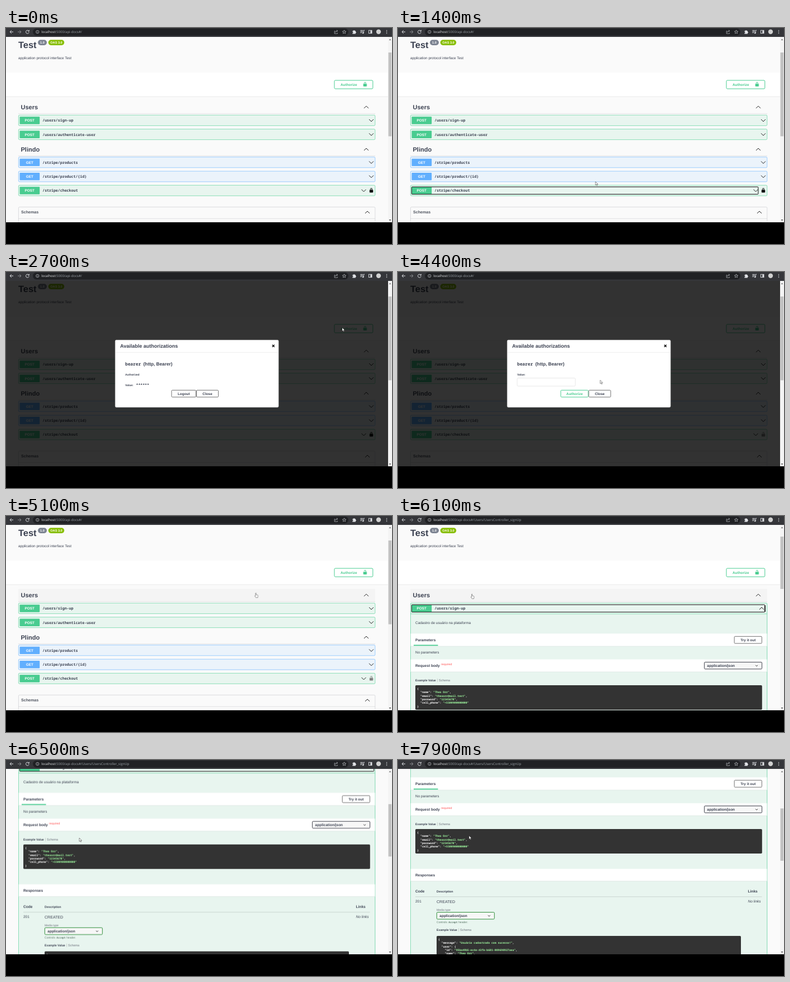
Animation, 690 px wide and 388 px high, one loop 8000 ms. Source, as an HTML page:

```html
<!DOCTYPE html>
<html lang="en">
<head>
<meta charset="utf-8">
<title>API docs</title>
<style>
html, body { margin: 0; width: 100%; height: 100%; overflow: hidden; background: #000; }
svg { display: block; width: 690px; height: 388px; }
text { font-family: "Liberation Sans", Arial, sans-serif; fill: #3b4151; white-space: pre; text-rendering: geometricPrecision; }
.b { font-weight: 700; }
.i { font-style: italic; }
.m { font-family: "Noto Sans Mono", "DejaVu Sans Mono", monospace; font-weight: 700; }
.url { font-family: "Open Sans", "Noto Sans", sans-serif; }
.mid { text-anchor: middle; }

/* timed states: 1% is 80 ms */
.focus, .modal, .signed, .unsigned, .list, .open, .fresh, .settled, .hover, .arrow, .hand, .pointer { animation: 8s step-end infinite; }
.focus { animation-name: focus; }
.modal { animation-name: modal; }
.signed { animation-name: signed; }
.unsigned { animation-name: unsigned; }
.list { animation-name: list; }
.open { animation-name: open; }
.fresh { animation-name: fresh; }
.settled { animation-name: settled; }
.hover { animation-name: hover; }
.arrow { animation-name: arrow; }
.hand { animation-name: hand; }
.pointer { animation-name: pointer; }
@keyframes focus { 0%, 100% { opacity: 0 } 17.3% { opacity: 1 } 31.8% { opacity: 0 } }
@keyframes modal { 0%, 100% { opacity: 0 } 32.3% { opacity: 1 } 62.3% { opacity: 0 } }
@keyframes signed { 0% { opacity: 1 } 51.1%, 100% { opacity: 0 } }
@keyframes unsigned { 0% { opacity: 0 } 51.1%, 100% { opacity: 1 } }
@keyframes list { 0% { opacity: 1 } 72.3%, 100% { opacity: 0 } }
@keyframes open { 0% { opacity: 0 } 72.3%, 100% { opacity: 1 } }
@keyframes fresh { 0% { opacity: 1 } 77.2%, 100% { opacity: 0 } }
@keyframes settled { 0% { opacity: 0 } 77.2%, 100% { opacity: 1 } }
@keyframes hover { 0%, 100% { opacity: 0 } 62.3% { opacity: 1 } 69% { opacity: 0 } 75% { opacity: 1 } 77.2% { opacity: 0 } }
@keyframes pointer { 0% { opacity: 0 } 17.3%, 100% { opacity: 1 } }
@keyframes hand { 0%, 100% { opacity: 0 } 30.6% { opacity: 1 } 32.3% { opacity: 0 } 48% { opacity: 1 } 54% { opacity: 0 } 60% { opacity: 1 } 77.2% { opacity: 0 } }
@keyframes arrow { 0%, 100% { opacity: 1 } 30.6% { opacity: 0 } 32.3% { opacity: 1 } 48% { opacity: 0 } 54% { opacity: 1 } 60% { opacity: 0 } 77.2% { opacity: 1 } }

/* motion */
.scroll { animation: scroll 8s linear infinite; }
.thumb { animation: thumb 8s linear infinite; }
.path { animation: path 8s linear infinite; }
@keyframes scroll {
  0%, 76.6% { transform: translateY(0) } 78.6%, 79.6% { transform: translateY(-90px) }
  82%, 100% { transform: translateY(-180px) }
}
@keyframes thumb {
  0%, 76.6% { transform: translateY(0) } 78.6%, 79.6% { transform: translateY(25px) }
  82%, 100% { transform: translateY(50px) }
}
@keyframes path {
  0%, 17.6% { transform: translate(353px, 276px) }
  27.5% { transform: translate(562px, 127px) }
  31%, 34.5% { transform: translate(601px, 100px) }
  38.75% { transform: translate(462px, 130px) }
  48.75%, 53% { transform: translate(319px, 217px) }
  60.5%, 62.3% { transform: translate(477px, 132px) }
  63.75% { transform: translate(446px, 138px) }
  70.5%, 73% { transform: translate(132px, 163px) }
  75.5%, 90% { transform: translate(131px, 140px) }
  93.75%, 95% { transform: translate(45px, 148px) }
  96.25% { transform: translate(40px, 130px) }
  98.6%, 100% { transform: translate(127px, 136px) }
}
</style>
</head>
<body>
<svg id="stage" viewBox="0 0 690 388"></svg>
<script>
const GREEN = '#49cc90', BLUE = '#61affe', INK = '#3b4151';

const text = (x, y, size, str, cls = '', fill = INK) =>
  `<text x="${x}" y="${y}" class="${cls}" style="font-size:${size}px;fill:${fill}">${str}</text>`;
const box = (x, y, w, h, fill = 'none', stroke = 'none', sw = 1, r = 0) =>
  `<rect x="${x}" y="${y}" width="${w}" height="${h}" rx="${r}" fill="${fill}" stroke="${stroke}" stroke-width="${sw}"/>`;
const line = (d, stroke = '#000', w = 1) =>
  `<path d="${d}" fill="none" stroke="${stroke}" stroke-width="${w}"/>`;
const rule = (y, x1 = 22, x2 = 660, c = '#c4c6cb') => line(`M${x1} ${y}H${x2}`, c, 0.5);
const group = (cls, ...parts) => `<g class="${cls}">${parts.join('')}</g>`;
const chevron = (x, y, up, r = 4, w = 1) =>
  line(`M${x - r} ${y + (up ? r : -r) / 2}l${r} ${up ? -r : r}l${r} ${up ? r : -r}`, '#222', w);

function lock(x, y, fill, open) {
  const gap = open ? 'V6h2v-.8C8 3.75 8.8 3 10 3s2 .75 2 2.2V8H4' : 'V8H4';
  const hole = open ? '' : 'M12 8H8V5.2C8 3.75 8.8 3 10 3s2 .75 2 2.2z';
  return `<path transform="translate(${x - 4.5} ${y - 4.5}) scale(.45)" fill="${fill}" fill-rule="evenodd"
    d="M15.8 8H14V5.6C14 2.7 12.7 1 10 1S6 2.7 6 5.6${gap}c-.55 0-1 .65-1 1.2V17c0 .55.43 1.14.95 1.3l1.2.4c.52.16 1.4.3 1.95.3h5.8c.55 0 1.43-.14 1.95-.3l1.2-.4c.52-.16.95-.75.95-1.3V9.2c0-.55-.65-1.2-1.2-1.2z${hole}"/>`;
}
const locks = (x, y, shut, free) =>
  group('signed', lock(x, y, shut)) + group('unsigned', lock(x, y, free, true));

function summary(y, verb, path) {
  const c = verb === 'GET' ? BLUE : GREEN;
  return box(24.5, y - 6.7, 35.7, 13.4, c, 'none', 0, 1) +
    text(42.3, y + 2.3, 6.4, verb, 'b mid', '#fff') + text(65.2, y + 2.3, 6.58, path, 'm');
}
function row(y, verb, path, arrowX = 653) {
  const get = verb === 'GET';
  return box(22.4, y - 9.6, 637.4, 19, get ? '#ebf3fb' : '#e8f5ef', get ? BLUE : GREEN, 0.6, 1.8) +
    summary(y, verb, path) + chevron(arrowX, y);
}
const tag = (y, name) => text(26.5, y, 11, name, 'b') + chevron(644, y - 4, true) + rule(y + 7.8);
const band = (y, h) => box(22.7, y, 636.8, h, '#fff', 'none', 0) + rule(y + h, 22.7, 659.5, '#cfd8d4');
const button = (x, y, w, h, label, c = '#707070', ink = INK) =>
  box(x, y, w, h, '#fff', c, 1, 1.5) + text(x + w / 2, y + h / 2 + 2.2, 6.4, label, 'b mid', ink);
const select = (x, y, c) => box(x, y, 103, 12.4, '#f7f7f7', c, 1, 1.6) +
  text(x + 5, y + 8.4, 6.5, 'application/json', 'b') + chevron(x + 93.5, y + 6.4, false, 2, 0.9);
const tabs = (x, y) => text(x, y, 5.25, 'Example Value', 'b') + line(`M${x + 39.5} ${y - 5}v6`, '#aaa', 0.5) +
  text(x + 42, y, 5.5, 'Schema', '', '#6b6f7a');
const code = (x, y, lines) => lines.map((s, i) => text(x, y + i * 6.4, 4.8,
  s.replace(/: (".*")/, ': <tspan fill="#a2fca2">$1</tspan>'), 'm', '#fff')).join('');

const user = ['"name": "Theo Orr",', '"email": "theoorr@mail.test",', '"password": "12345678",', '"cell_phone": "+5500900000000"'];

const intro =
  box(0, 16, 683, 1000, '#fafafa') +
  text(22, 36, 16.4, 'Test', 'b') +
  box(57, 21.3, 16, 9.6, '#7d8492', 'none', 0, 4.8) + text(65, 28, 5.6, '1.0', 'b mid', '#fff') +
  box(75.6, 21.3, 28.6, 9.6, '#89bf04', 'none', 0, 4.8) + text(90, 28, 5.6, 'OAS 3.0', 'b mid', '#fff') +
  text(22, 56, 6.42, 'application protocol interface Test') +
  box(0, 80, 683, 43, '#fff') + rule(123.3, 0, 683, '#d8d8d8') +
  box(587, 94, 68.8, 15.2, '#fff', GREEN, 1, 1.8) + text(598, 103.6, 6.4, 'Authorize', 'b', GREEN) +
  locks(641.8, 101, GREEN, GREEN) +
  group('hover', box(22, 131, 638, 22.5, 'rgba(0,0,0,.022)')) +
  tag(146.2, 'Users');

const collapsed = group('list',
  row(166, 'POST', '/users/sign-up'),
  row(191.2, 'POST', '/users/authenticate-user'),
  tag(222, 'Plindo'),
  row(241.4, 'GET', '/stripe/products'),
  row(266.8, 'GET', '/stripe/product/{id}'),
  row(292, 'POST', '/stripe/checkout', 639.5),
  locks(653, 291.6, '#000', '#808080'),
  group('focus', box(24.3, 285.4, 619.6, 13.2, 'none', '#111', 1, 1)),
  box(22.4, 321.6, 637.4, 100, '#fafafa', '#c4c6cb', 0.6, 1.8),
  text(27, 333, 7.1, 'Schemas', 'b', '#505560'), chevron(646, 331, true), rule(342.3),
  box(31.5, 348, 619, 20, '#ececec'));

const expanded = group('open',
  box(22.4, 156.4, 637.4, 620, '#e8f5ef', GREEN, 0.7, 1.8),
  line('M22.4 175.8H659.8', GREEN, 0.6),
  summary(166, 'POST', '/users/sign-up'),
  group('fresh', box(24.3, 159.4, 631.4, 13.2, 'none', '#111', 1, 1), line('M656 160.5v11.5', '#222', 1.8), chevron(650, 166, true)),
  group('settled', box(24.3, 159.4, 633.4, 13.2, 'none', '#111', 1, 1), chevron(653, 166, true)),
  text(31, 194.2, 6.44, 'Cadastro de usuário na plataforma'),
  band(211.2, 22.8), text(31, 224.8, 6.68, 'Parameters', 'b'),
  box(28, 231.4, 43.5, 1.8, GREEN), button(601.2, 216.3, 49.2, 12.6, 'Try it out'),
  text(31, 246.6, 6.43, 'No parameters'),
  band(257.6, 22.4), text(31, 270.8, 6.62, 'Request body', 'b'), text(77, 268, 5.3, 'required', '', '#f55'),
  select(547.6, 262.5, '#41444e'),
  tabs(31, 297.2),
  box(31, 304, 619.8, 44, '#333', 'none', 0, 1.8),
  code(34.3, 311.8, ['{', ...user.map(s => '  ' + s), '}']),
  band(375.6, 22), text(31, 388.8, 6.6, 'Responses', 'b'),
  text(31, 418.4, 6.6, 'Code', 'b'), text(69, 418, 5.4, 'Description', 'b'), text(625.5, 418.4, 6.6, 'Links', 'b'),
  rule(425.7, 31, 650.5, '#aab5b0'),
  text(31, 436.4, 6.5, '201'), text(69, 436.8, 7.05, 'CREATED'), text(625.5, 436.4, 6.5, 'No links', 'i'),
  text(69, 450.8, 5.1, 'Media type', '', '#6b6f7a'),
  select(69.3, 453.5, '#2f8f3a'),
  text(69, 473.2, 5.1, 'Controls', '', '#5f7a6c'), text(90.3, 473.2, 4.5, 'Accept', 'm', '#5f7a6c'), text(108, 473.2, 5.1, 'header.', '', '#5f7a6c'),
  tabs(69, 487.2),
  box(69, 496, 544, 130, '#333', 'none', 0, 1.8),
  code(72, 503.8, ['{', '  "message": "Usuário cadastrado com sucesso!",', '  "user": {',
    '    "id": "95ba49b5-ec4e-43fe-b681-089698927aea",', ...user.map(s => '    ' + s), '  }', '}']));

const modal = group('modal',
  box(0, 16, 683, 333, 'rgba(0,0,0,.8)'),
  box(195.3, 122.3, 291.8, 120.6, '#fff', '#ebebeb', 0.6, 1.8),
  text(204, 136.2, 9, 'Available authorizations', 'b'),
  line('M475.9 130.7l4 4m0-4l-4 4', '#000', 1.3), rule(144.4, 195.5, 487, '#dcdcdc'),
  text(213, 168.4, 7.8, 'bearer', 'm'), text(245.6, 168.4, 8.28, '(http, Bearer)', 'b'),
  group('signed',
    text(213, 186.3, 4.9, 'Authorized', 'b'), text(213, 205.2, 5, 'Value:', 'b'),
    text(232.5, 205.4, 6.5, '******', 'm'),
    button(296, 212.3, 43.6, 12.4, 'Logout'), button(340.4, 212.3, 39.2, 12.4, 'Close')),
  group('unsigned',
    text(213, 186.3, 5, 'Value:', 'b'), box(213, 190.5, 104, 14.5, '#fff', '#d9d9d9', 0.6, 1.8),
    button(291, 212.3, 49, 12.4, 'Authorize', GREEN, GREEN), button(341, 212.3, 39.2, 12.4, 'Close')));

const scrollbar =
  box(683, 16, 7, 333, '#f4f4f4') +
  '<path d="M684.6 22l1.9-2.4 1.9 2.4z" fill="#777"/><path d="M684.6 344l1.9 2.4 1.9-2.4z" fill="#555"/>' +
  group('list', box(683.6, 44, 5.6, 150.5, '#c1c1c1')) +
  group('open', group('thumb', box(683.6, 37, 5.6, 94, '#c1c1c1')));

const pale = '#dfe1e5';
const toolbar =
  box(0, 0, 690, 16, '#35363a') + box(48, 0.8, 564, 12.6, '#202124', 'none', 0, 6.3) +
  line('M13 7H7.2M9.8 4.2L7 7l2.8 2.8', pale) +
  line('M21 7h5.8M24.2 4.2L27 7l-2.8 2.8', '#8b8d91') +
  line('M40.6 5.2A2.9 2.9 0 1 0 41.2 7.6M41.3 3.6v2.2h-2.3', pale) +
  '<circle cx="56.3" cy="7" r="2.7" fill="none" stroke="#c4c7cc" stroke-width=".7"/>' + line('M56.3 6.6v2M56.3 5.2v.7', '#c4c7cc', 0.7) +
  text(63.3, 9.2, 6.03, 'localhost<tspan fill="#9aa0a6">:5000/api-docs#/<tspan class="open-url"></tspan></tspan>', 'url', '#e8eaed') +
  group('open', text(135.9, 9.2, 6.03, 'Users/UsersController_signUp', 'url', '#9aa0a6')) +
  line('M588.6 5.5h-1.4v4.6h5.4V8.6M588.8 8.2c.3-2 1.6-3 3.6-3M591 3.6l1.8 1.6L591 6.8', '#c4c7cc', 0.7) +
  line('M604.6 3.8l.9 2.1 2.3.2-1.8 1.5.6 2.3-2-1.2-2 1.2.6-2.3-1.8-1.5 2.3-.2z', '#c4c7cc', 0.7) +
  '<path d="M619.4 5h1.7a1.1 1.1 0 0 1 2.2 0h1.6v1.8a1.1 1.1 0 0 1 0 2.2v1.6h-5.5V8.8a1.1 1.1 0 0 0 0-2.2z" fill="#dfe1e5"/>' +
  line('M633.4 4.4h4.6M633.4 6.4h4.6M633.4 8.4h2.8M639.2 9V4.2h1.8', pale) +
  '<circle cx="638.3" cy="9" r="1.3" fill="#dfe1e5"/>' +
  box(648.4, 4.2, 5.6, 5.4, 'none', pale, 0.9) + box(651.4, 4.2, 2.6, 5.4, pale) +
  '<circle cx="666" cy="6.8" r="4.2" fill="#d0d0d0"/>' +
  [4.4, 7, 9.6].map(y => `<circle cx="680.5" cy="${y}" r=".75" fill="${pale}"/>`).join('');

const pointer = group('pointer', group('path',
  group('arrow', '<path d="M0 0v6.3l1.5-1.3 1 2.2 1-.4-1-2.2h2z" fill="#fff" stroke="#222" stroke-width=".5"/>'),
  group('hand', '<path d="M.6.6q.6-.9 1.2 0v2.8l2.6.6q.8.3.7 1.2l-.6 3.4H1.2L-.8 5.6q.2-.9 1.4 0z" fill="#fff" stroke="#333" stroke-width=".5"/>')));

document.getElementById('stage').innerHTML =
  '<clipPath id="view"><rect y="16" width="690" height="333"/></clipPath>' +
  box(0, 0, 690, 388, '#000') +
  `<g clip-path="url(#view)">${group('scroll', intro, collapsed, expanded)}${modal}${scrollbar}</g>` +
  toolbar + pointer;
</script>
</body>
</html>
```
